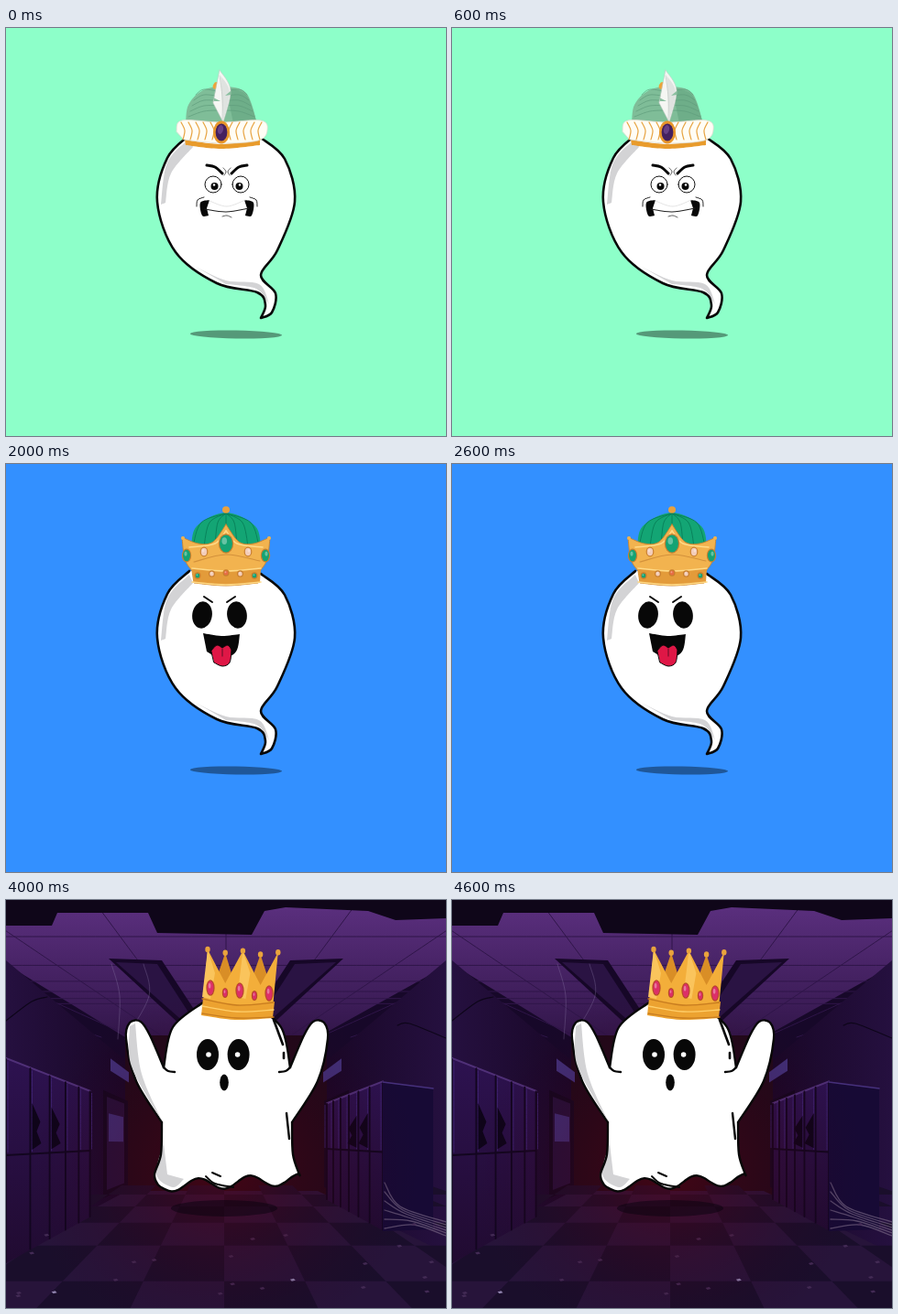
These frames come from a looping animation (480 by 446 pixels, 5000 ms). An HTML page:

```html
<!DOCTYPE html>
<html lang="en">
<head>
<meta charset="utf-8">
<title>Ghost parade</title>
<style>
  html, body { margin: 0; width: 100%; height: 100%; overflow: hidden; }
  svg { display: block; width: 100%; height: 100%; }
  .scene { display: none; }
  .scene.on { display: inline; }
</style>
</head>
<body>
<svg id="stage" viewBox="0 0 480 446" stroke-linecap="round" stroke-linejoin="round"></svg>
<script>
const INK = '#080808', GREY = '#d3d3d5';

// Smooth curve through "x,y" points; a "!" after a point makes it a corner.
function spline(text) {
  const p = text.trim().split(/\s+/).map(t => {
    const [x, y] = t.split(',').map(parseFloat);
    return { x, y, corner: t.endsWith('!') };
  });
  let d = `M${p[0].x} ${p[0].y}`;
  for (let i = 0; i < p.length - 1; i++) {
    const b = p[i], c = p[i + 1];
    const a = b.corner ? b : p[i - 1] || b, e = c.corner ? c : p[i + 2] || c;
    d += `C${b.x + (c.x - a.x) / 6} ${b.y + (c.y - a.y) / 6} ` +
         `${c.x - (e.x - b.x) / 6} ${c.y - (e.y - b.y) / 6} ${c.x} ${c.y}`;
  }
  return d;
}

const path = (d, fill, stroke = 'none', w = 1, more = '') =>
  `<path d="${d}" fill="${fill}" stroke="${stroke}" stroke-width="${w}" ${more}/>`;
const shape = (pts, fill, stroke, w, more) => path(spline(pts) + 'Z', fill, stroke, w, more);
const line = (pts, stroke = INK, w = 2, more) => path(spline(pts), 'none', stroke, w, more);
const poly = (pts, fill, more = '') => `<polygon points="${pts}" fill="${fill}" ${more}/>`;
const oval = (x, y, rx, ry, fill, more = '', turn = 0) =>
  `<ellipse cx="${x}" cy="${y}" rx="${rx}" ry="${ry}" fill="${fill}" transform="rotate(${turn} ${x} ${y})" ${more}/>`;
const rect = (x, y, w, h, fill, more = '') =>
  `<rect x="${x}" y="${y}" width="${w}" height="${h}" fill="${fill}" ${more}/>`;
const back = fill => rect(0, 0, 480, 446, fill);
const shadow = (x, y, rx, ry, turn) => oval(x, y, rx, ry, '#000', 'opacity=".4"', turn);
const range = (n, f, glue = '') => Array.from({ length: n }, (_, i) => f(i)).join(glue);

// Mirror images about the vertical line x = cx: of points, and of drawings.
const flip = (pts, cx) => pts.split(' ').reverse().map(p => {
  const [x, y] = p.split(',');
  return `${2 * cx - x},${y}`;
}).join(' ');
const both = (s, cx) => `${s}<g transform="translate(${2 * cx}) scale(-1 1)">${s}</g>`;

function random(seed) {
  return () => (seed = (seed * 16807) % 2147483647) / 2147483647;
}

// Ghosts

function dropGhost() {
  const body = '200,117 176,142 165,190 185,245 230,279 274,289 283,303 278,317! ' +
    '290,311 294,290 278,270 296,243 315,190 304,143 278,120';
  return shadow(251, 335, 50, 4.4, 1) + shape(body, '#fff') +
    shape('200,121 176,147 169,193! 174,191! 180,159 204,130', GREY) +
    shape('207,261 240,276 276,280 287,302! 273,285 240,280', GREY) +
    line(body, INK, 2.6);
}

function plumpGhost() {
  const cx = 240.5, side = '200,120 188,131 176,152 167,210 166,236 172,260!';
  const skirt = '172,260! 169,285 157,309! 172,316 217,297 240,306 305,310 323,293! 313,260!';
  return shadow(238, 328, 60, 8, -1) +
    shape(`${side} ${skirt} ${flip(side, cx)}`, '#fff') +
    shape('188,138 175,165 171,205! 179,180 190,148', GREY) +
    shape('169,210 175,256 194,271 212,263! 189,248', GREY) +
    shape('173,265 162,311! 198,305! 178,297', GREY) +
    both(line('188,131 176,152 167,210 168,245 189,273 216,263 214,241 184,203'), cx) +
    line(skirt) + line('309,266 312,272 312,279', INK, 2.4) + line('283,131 290,139');
}

// Wavy lower edge that drops lowest at x = low.
const hem = (from, to, low, period, y, amp) => range(22, i => {
  const x = from + (to - from) * i / 21;
  return `${x},${y - (x - low) * .05 + amp * Math.cos((x - low) / period * 2 * Math.PI)}`;
}, ' ');

function sheetGhost(cx, side, edge) {
  const body = `${side} ${edge} ${flip(side, cx)}`;
  return shape(body, '#fff') + shape('172,266 164,300 182,314 194,305! 176,300', GREY) + line(body, INK, 2.4);
}

function wavyGhost() {
  const side = '205,115 187,132 176,152 173,185 172,211! 157,199 150,209 160,232 174,244! 171,266 163,294';
  return sheetGhost(241, side, hem(166, 322, 176, 45, 304, 8)) +
    line('185,140 179,158 178,177') + line('304,142 306,161', INK, 2.4) + line('306,167 306,173', INK, 2.4) +
    line('309,251 315,269', INK, 2.4) + line('316,274 319,289');
}

function cheerGhost() {
  const side = '215,112 182,139 172,183! 157,148 147,133 135,134 131,152 142,198 170,243! 169,278 162,300';
  return sheetGhost(241, side, hem(166, 319, 182, 56, 312, 6.5)) +
    shape('135,138 137,182 171,243! 148,190 141,135', GREY) +
    both(line('172,183 177,187 184,188', INK, 2.4), 241) +
    line('292,131 302,158', INK, 2.6) + line('303,167 303,173', INK, 2.6) +
    line('306,233 309,261', INK, 2.4) + line('218,302 228,310 248,314') + line('225,298 234,302');
}

// Faces

const roundEyes = () =>
  both(oval(220, 169, 12, 17, INK) + oval(221, 169, 2.8, 2.8, '#fff'), 236.8) + oval(238, 199.5, 4.8, 9, INK);

function angryFace() {
  const half = line('219,150 228,152 236,159', INK, 3) + line('237,153 240,157 238,161', '#333', .8) +
    oval(226, 171, 9, 9, '#fff', 'stroke="#111"') + oval(227.5, 173, 4, 4, INK) + oval(227, 171.5, 1.2, 1.2, '#fff') +
    shape('222,188! 212,191 214,205 221,205! 219,197', INK) + line('216,185 209,188 208,195', '#222', 1);
  return both(half, 241) + line('222,189 241,195 261,188', '#ddd', .8) +
    line('217,198 240,201 265,197', '#222', 1.1) + line('236,206 241,205 246,207', '#333', .8);
}

function cheekyFace() {
  return both(oval(214, 165, 10.8, 14.7, INK, '', 8) + line('216,145 225,151'), 233) +
    shape('215,185! 235,188 255,186! 251,205 235,213 219,205', INK) +
    shape('224,204! 230,198 236,201! 242,198 246,203! 244,217 236,221 227,217', '#df1746', INK, 1) +
    line('236,202 236,210', '#74102b', 1.2);
}

function toothyFace() {
  return both(shape('209,177! 211,160 225,152 235,166 229,178', INK) + oval(225, 167, 4.4, 4.4, '#fff'), 240) +
    shape('210,190! 242,196 274,189! 263,211 242,215 220,210', INK) +
    both(rect(233, 195, 8.5, 9, '#fff', 'rx="1"'), 242.5);
}

// Headwear

function witchHat(main, dark, light, band) {
  const fringe = range(19, i => `${298 - i * 6},${(i % 2 ? 127 : 133) - 4 * Math.sin(i / 3)}!`, ' ');
  return shape(`171,136! 190,120 206,104! 214,80 240,56 262,48 282,59 306,98! 279,86! 284,106! 303,121 318,138! ${fringe}`,
      main, '#15132a', 1.2) +
    shape('254,62! 282,68 303,96! 277,85 260,74', dark) + shape('250,74! 272,84 279,98! 256,96', dark) +
    shape('223,79! 238,63 258,52! 236,78 226,94! 214,95!', light) +
    shape('194,125! 213,112 242,110! 216,119 207,129!', light) +
    shape('255,110! 282,109 311,136! 281,122', dark) +
    shape('205,105! 208,95! 245,98 280,94! 283,105! 245,103', band, '#182a47', .8) +
    range(4, i => line(`${222 + i * 14},113 ${210 + i * 20},125`, dark, 1.3));
}

function turban() {
  const cx = 235;
  return shape('196,106! 199,84 215,68 238,64 262,71 274,104!', '#7fbd98') +
    shape('240,65 262,73 274,104! 248,104!', '#6eae89') +
    range(5, i => both(line(`${199 + i * 2},${97 - i * 6} 216,${91 - i * 6} 235,${90 - i * 5}`, '#5f9d7b', .7), cx)) +
    oval(229, 63, 3, 4, '#eca43a', '', 30) +
    shape('195,122! 235,127 277,122! 277,128! 235,132 196,128!', '#e89b2c') +
    shape('186,113 192,101 235,103 278,101 285,112 275,123 235,126 194,122', '#fffdf5', '#dedbd0', .8) +
    both(range(5, i => line(`${191 + i * 8},103 ${195 + i * 8},112 ${193 + i * 8},122`, '#e7a443', 1.2)), cx) +
    shape('233,46! 245,68 237,103! 226,82', '#f5f6f3', '#c3cbc5', .6) +
    shape('234,52! 244,70 237,102!', '#dfe3e0') + line('233,52 236,76 236,101', '#c3c9c4', .7) +
    poly('226,76 234,80 227,80', '#8abf9f') + poly('245,69 239,74 245,73', '#8abf9f') +
    oval(235, 114, 9, 12.5, '#e7962b') + oval(235, 114, 6.4, 9.5, '#44205f') + oval(234, 111, 3, 5, '#684085', '', 15);
}

const gem = (x, y, rx, ry, fill, rim) => oval(x, y, rx + 1.2, ry + 1.2, rim) + oval(x, y, rx, ry, fill) +
  oval(x - rx * .25, y - ry * .3, rx * .4, ry * .4, '#fff', 'opacity=".35"');

function royalCrown() {
  const cx = 240, green = '#14a374', pink = '#f3cdb9', rim = '#c87f2f';
  const side = '240,66! 226,85 210,87 192,80! 195,104 203,117! 205,130!';
  return shape('202,92! 208,68 240,53 272,68 278,92!', '#13a574') +
    range(7, i => line(`240,54 ${213 + i * 9},64 ${204 + i * 12},90`, '#087e59', .9)) +
    oval(cx, 50, 4, 3.8, '#e9a13e') +
    shape(`${side} 240,133 ${flip(side, cx)}`, '#f2b34f', '#c9842e', .9) +
    both(line('240,73 228,87 200,91', '#ffda87', 1.5) + oval(193, 81, 2, 2, '#f2b34f'), cx) +
    line('205,107 240,99 277,106', '#d3913b', 1.2) +
    shape('203,114! 240,117 278,114! 277,130! 240,133 205,130!', '#e39b3a') +
    range(2, i => line(`203,${114 + i * 15} 240,${117 + i * 15} 278,${114 + i * 15}`, '#ffda87', 1.6)) +
    both(gem(197, 100, 4, 6.3, green, rim) + gem(216, 96, 3.2, 4.2, pink, rim), cx) + gem(cx, 87, 7, 9.5, green, rim) +
    range(5, i => gem(209 + i * 15.5, 122 - 3 * Math.sin(i * Math.PI / 4), 2.3, 2.5, i % 2 ? pink : i % 4 ? '#e66d45' : green, rim));
}

function goldCrown() {
  const x = i => 220 + 19.2 * i, y = i => 54 + i % 2 * 3 + i * .8;
  const spikes = range(5, i => i % 2 ? `${x(i)},${90 + i}` : `${x(i)},${y(i)}`, ' ');
  return [1, 3].map(i => poly(`${x(i)},${y(i)} ${x(i) - 15},102 ${x(i) + 14},104`, '#d98e26')).join('') +
    poly(`${spikes} 290,128 214,126`, '#f3ae3a') +
    [0, 2].map(i => poly(`${x(i)},${y(i)} ${x(i) + 8},80 ${x(i) + 3},108 ${x(i) - 6},106`, '#fac45c')).join('') +
    shape('215,107! 252,114 293,111! 291,129! 250,131 213,126!', '#eca230') +
    range(3, i => line(`214,${108 + i * 8} 252,${115 + i * 7} 292,${112 + i * 8}`, i % 2 ? '#ffcf6a' : '#c87d20', 1.4)) +
    range(5, i => oval(x(i), y(i), 2.7, 3.2, '#e9a33d') +
      gem(223 + i * 16, 96 + i * 1.5 + i % 2 * 4, i % 2 ? 2 : 3.4, i % 2 ? 4.3 : 7.6, '#dc2f68', '#b64a2a'));
}

// Places

function castle() {
  const rnd = random(41), cx = 236;
  let s = back('url(#wall)');
  for (let y = -24; y < 386; y += 45) {
    s += line(`0,${y} 240,${y + 2} 480,${y - 2}`, '#140446', 1.6);
    for (let x = rnd() * 70; x < 480; x += 70 + rnd() * 60) s += line(`${x},${y} ${x + 1},${y + 45}`, '#140446', 1.5);
  }

  const arch = (k, fill, edge, w, more) => {
    const r = 126 - k, top = 22 + k * 1.15;
    return path(`M${cx - r} 385V165C${cx - r * .98} ${top + 98 - k * .4} ${cx - r * .65} ${top + 50 - k * .3} ${cx} ${top}` +
      `C${cx + r * .65} ${top + 50 - k * .3} ${cx + r * .98} ${top + 98 - k * .4} ${cx + r} 165V385Z`, fill, edge, w, more);
  };
  const joints = 'stroke-dasharray="1.6 34" stroke-linecap="butt"';
  s += arch(0, '#2b1a4b', '#0d0737', 1.5) + arch(9, 'none', '#120833', 18, joints) +
    arch(19, '#0f0934') + arch(37, '#29164b') + arch(48, 'none', '#130933', 20, joints) + arch(61, '#2b0a42') +
    rect(172, 290, 129, 78, 'url(#door)') +
    range(9, i => line(`${172 + i * 16},290 ${172 + i * 16},368`, '#23052f', 1.6)) +
    rect(174, 311, 5, 18, '#74709c') + rect(291, 301, 6, 27, '#74709c') +
    oval(241, 332, 67, 10, '#13052c', 'opacity=".6"');

  // moonlight through the window
  s += back('url(#moon)') +
    poly('0,20 0,78 110,138 132,84', '#7290ff', 'opacity=".16"') + poly('28,0 74,0 150,78 128,92', '#7290ff', 'opacity=".14"') +
    poly('108,85 30,268 165,312 165,110', '#4e7be8', 'opacity=".14"') +
    shape('94,95! 55,150 32,264! 75,275! 94,150', '#79a0ff', 'none', 0, 'opacity=".27"') +
    shape('108,85! 137,83 157,122! 133,302! 92,284!', '#79a0ff', 'none', 0, 'opacity=".22"') +
    line('48,185 150,160', '#243597', 4, 'opacity=".5"') +
    range(14, () => {
      const x = 10 + rnd() * 155, y = 5 + rnd() * 220, r = 1 + rnd() * 3;
      return oval(x, y, r, r, '#5866ff', 'opacity=".5"') + oval(x, y, .8, .8, '#a9c4ff');
    }) +
    both(poly('0,207 28,210 26,218 5,222 8,242 0,254', '#4e557b') + poly('0,217 25,217 5,223 0,241', '#292c54'), 240);

  // steps
  return s + rect(0, 386, 480, 60, 'url(#ground)') + line('0,386 480,386', '#0b0628') +
    poly('20,398 65,379 146,364 328,364 402,376 453,396', '#251747') +
    poly('150,364 326,364 349,404 135,404', '#301540') +
    poly('20,398 453,396 453,409 20,411', '#150b30') + poly('27,411 448,410 438,431 39,433', '#100a30') +
    range(4, i => line(`${150 + i * 59},364 ${135 + i * 71},410`, '#0d0624', 1.5)) +
    both(line('65,380 142,384', '#0d0624', 1.5), 238) +
    range(6, i => line(`${i * 95 - 15},446 ${i * 85 + 25},414`, '#0c0728', 1.5)) +
    poly('88,430 260,430 264,446 78,446', '#3c0a32');
}

function school() {
  const rnd = random(83), cx = 240;
  // Left wall in perspective; h is the height below eye level at the stage edge.
  const at = (x, h) => `${x},${266 + h * (238 - x) / 238}`;
  const panel = (a, b, top, low, fill) => poly([at(a, top), at(b, top), at(b, low), at(a, low)].join(' '), fill);
  const depth = k => 238 * (1 - 1 / (1 + k * .125));

  const side = panel(0, 130, -200, 130, 'url(#side)') +
    poly('112,64 170,66 214,133 194,140', '#160727') + poly('120,68 165,70 205,132 196,135', '#2a1343') +
    panel(106, 133, -105, 108, '#14071f') + panel(110, 129, -95, 95, '#251039') +
    panel(112, 128, -62, -4, '#3f2c73') + panel(114, 134, -178, -152, '#42307a');

  const lockers = (from, to) => {
    const a = depth(from), b = depth(to);
    return panel(a, b, -93, 131, 'url(#locker)') + line(`${at(a, -93)} ${at(b, -93)}`, '#503078', 2) +
      line(`${at(a, 13)} ${at(b, 13)}`, '#12061f') +
      range(to - from + 1, i => {
        const x = depth(from + i);
        return line(`${at(x, -92)} ${at(x, 130)}`, '#12061f', 1.8) + line(`${at(x + 2, -90)} ${at(x + 2, 10)}`, '#43287a', .8);
      }) +
      range(2, i => {
        const x = depth(from + i + 1) + 2;
        return poly(`${at(x, -50)} ${at(x + 9, -28)} ${at(x + 5, -15)} ${at(x + 10, 0)} ${at(x, 8)}`, '#0e0419');
      });
  };

  let s = back('#170829') + poly('0,0 480,0 480,72 340,150 130,150 0,70', 'url(#ceiling)') +
    range(9, i => line(`${-340 + i * 145},0 ${104 + i * 34},150`, '#2f1549', 1)) +
    range(6, i => line(`0,${150 - 110 / (1 + i * .4)} 480,${150 - 110 / (1 + i * .4)}`, '#2f1549', 1)) +
    rect(130, 148, 220, 180, '#200919') + both(side, cx);

  // floor
  const rowY = k => 235 + 1 / (.0055 + .0015 * k);
  const tile = (i, y) => `${238 + i * .485 * (y - 235)},${y}`;
  s += poly('0,388 132,318 340,318 480,386 480,446 0,446', '#27143a');
  for (let k = -1; k < 5; k++)
    for (let i = -7 + (k & 1); i < 7; i += 2) {
      const a = rowY(k), b = rowY(k + 1);
      s += poly(`${tile(i, a)} ${tile(i + 1, a)} ${tile(i + 1, b)} ${tile(i, b)}`, '#1a0e2b');
    }

  s += lockers(0, 5) + `<g transform="translate(476) scale(-1 1)">${lockers(3, 9)}</g>` +
    poly('411,200 466,206 466,360 411,362', '#170a35') + line('411,199 466,206', '#46307c', 1.5);

  // broken ceiling, cracks, web and litter
  s += poly('0,0 480,0 480,20 425,22 395,12 305,8 282,12 268,38 165,36 155,14 56,14 50,28 0,28', '#0f0619') +
    line('480,151 440,135 427,137', '#0d0519', 1.2) + line('0,132 28,111 45,106', '#0d0519', 1.2) +
    range(2, i => line(`${115 + i * 35},70 ${124 + i * 32},105 ${122 + i * 8},152`, '#8b78a5', .7, 'opacity=".5"')) +
    range(6, i => line(`413,${309 + i * 10} ${430 + i * 3},${335 + i * 4} 480,${352 + i * 3}`, '#786884', 1.3, 'opacity=".65"')) +
    range(22, () => {
      const x = rnd() * 460 + 10, y = 345 + rnd() * 95;
      return poly(`${x},${y} ${x + 4},${y - 1} ${x + 6},${y + 1} ${x + 2},${y + 2}`, rnd() > .8 ? '#8f82ad' : '#432b55');
    });
  return s + back('url(#red)') + oval(238, 337, 58, 9, '#09030f', 'opacity=".5"');
}

const grad = (id, stops, kind = 'linear', attrs = 'x1="0" y1="0" x2="0" y2="1"') =>
  `<${kind}Gradient id="${id}" ${attrs}>` +
  stops.map(([at, c, o = 1]) => `<stop offset="${at}" stop-color="${c}" stop-opacity="${o}"/>`).join('') + `</${kind}Gradient>`;

const defs = '<defs>' +
  grad('wall', [[0, '#1f0755'], [.5, '#230660'], [1, '#1a064e']]) +
  grad('moon', [[0, '#4a86e6', .6], [.45, '#3458bb', .3], [1, '#1a157a', 0]], 'radial', 'cx=".25" cy=".33" r=".38"') +
  grad('door', [[0, '#3b084e'], [1, '#540759']]) +
  grad('ground', [[0, '#150d3a'], [1, '#191947']]) +
  grad('ceiling', [[0, '#5c3080'], [1, '#32164a']]) +
  grad('side', [[0, '#25103f'], [1, '#190727']], 'linear', '') +
  grad('locker', [[0, '#2d1250'], [1, '#210b31']]) +
  grad('red', [[0, '#76000f', .42], [.55, '#4b0016', .2], [1, '#26001c', 0]], 'radial', 'cx=".49" cy=".66" r=".45"') +
  '</defs>';

const scenes = [
  back('#8dffc9') + dropGhost() + turban() + angryFace(),
  back('#ff3333') + plumpGhost() + witchHat('#343251', '#26243f', '#474568', '#34658f') + roundEyes(),
  back('#3390ff') + dropGhost() + royalCrown() + cheekyFace(),
  castle() + wavyGhost() + witchHat('#3b3a4c', '#292838', '#50506a', '#2f6680') + toothyFace(),
  school() + cheerGhost() + goldCrown() + roundEyes()
];

const stage = document.getElementById('stage');
stage.innerHTML = defs + scenes.map(s => `<g class="scene">${s}</g>`).join('');
const groups = stage.querySelectorAll('.scene');
const HOLD = 1000, start = performance.now();

function draw() {
  const now = Math.floor((performance.now() - start) / HOLD) % groups.length;
  groups.forEach((g, i) => g.classList.toggle('on', i === now));
  requestAnimationFrame(draw);
}
draw();
</script>
</body>
</html>
```
